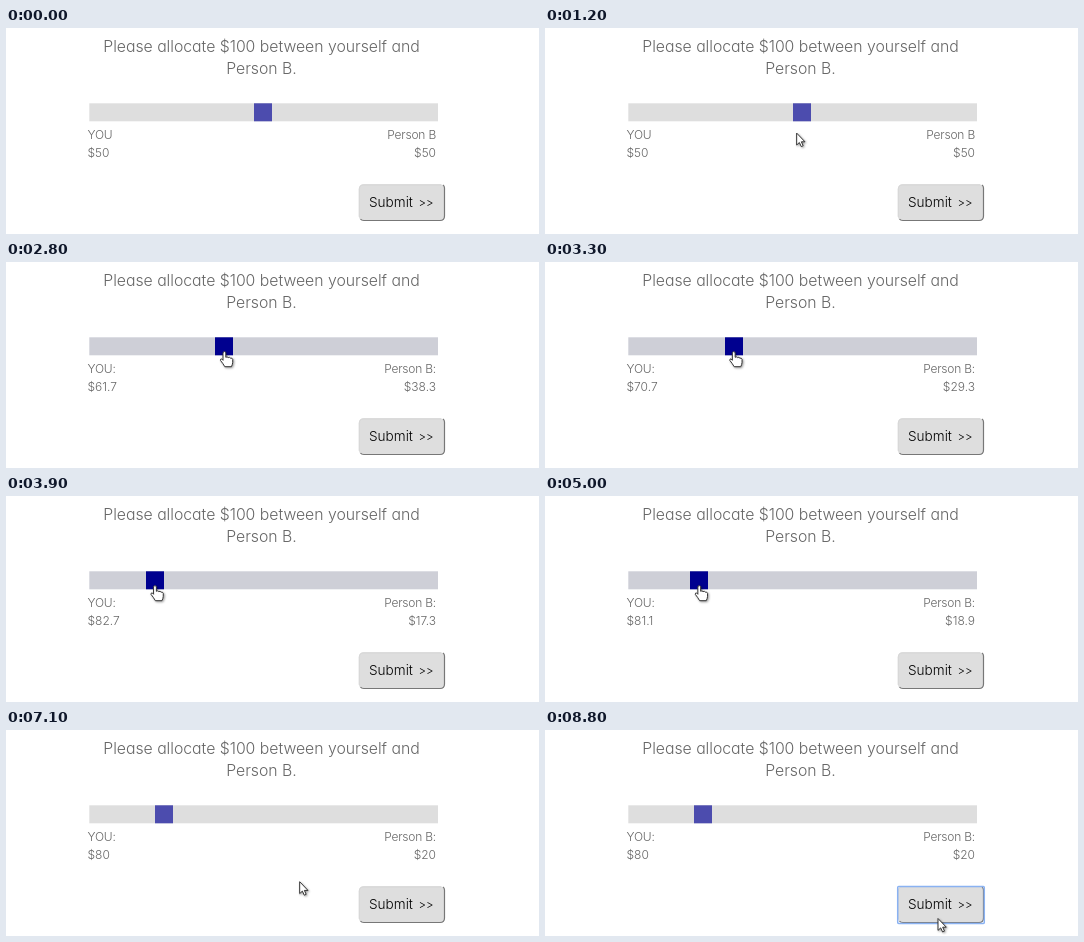
Write an HTML page that moves like this. It is 533 px wide and 206 px high and loops after 9600 ms.

```html
<!DOCTYPE html>
<html lang="en">
<head>
<meta charset="utf-8">
<title>Allocation slider</title>
<style>
  html, body { margin: 0; width: 100%; height: 100%; overflow: hidden; background: #fff; }
  svg { display: block; width: 100vw; height: 100vh; }
  text { font: 300 12px Inter, "Open Sans", sans-serif; font-feature-settings: "cv11"; fill: #666; }
  .title text { font-size: 15.8px; text-anchor: middle; letter-spacing: -.02px; }
  .label { letter-spacing: -.2px; }
  .right { text-anchor: end; }
  .submit { font-size: 13.6px; fill: #000; }
  .submit tspan { font-size: 11.5px; }
  .edge { fill: none; stroke-width: 1.2; }
  .cursor path { fill: #fff; stroke: #333; stroke-width: 1; stroke-linejoin: round; }
  .cursor { filter: drop-shadow(1.5px 1.5px 1px rgba(0, 0, 0, .4)); }
</style>
</head>
<body>
<svg viewBox="0 0 533 206">
  <g class="title">
    <text x="255.5" y="24">Please allocate $100 between yourself and</text>
    <text x="255.5" y="46">Person B.</text>
  </g>

  <rect id="track" x="83.3" y="75.3" width="348.7" height="18"/>
  <rect id="thumb" y="75.3" width="18" height="18"/>

  <text id="youLabel" class="label" x="81.5" y="111.3"></text>
  <text id="youValue" x="81.5" y="129.3"></text>
  <text id="otherLabel" class="label right" x="430" y="111.3"></text>
  <text id="otherValue" class="right" x="430" y="129.3"></text>

  <rect x="352.8" y="156.2" width="86.2" height="36.8" rx="5" fill="#dedede"/>
  <path id="edgeTop" class="edge" d="M353.4 189V161Q353.4 156.8 358 156.8H435"/>
  <path id="edgeBottom" class="edge" d="M354.5 191Q355.5 192.5 358 192.5H434Q438.5 192.5 438.5 188V160Q438.5 158 437 157"/>
  <rect id="focus" x="352.7" y="156.4" width="86.6" height="37" rx="1" fill="none" stroke="#8ab2f2" stroke-width="1.5"/>
  <text class="submit" x="363" y="179.4">Submit <tspan x="412.5">&gt;&gt;</tspan></text>

  <g id="arrow" class="cursor"><path d="M.5 .5V12.4L3.2 9.9L5.1 14L7 13.1L5.2 9.2H8.8Z"/></g>
  <g id="hand" class="cursor">
    <path d="M-1.4 1.2Q0 -.6 1.4 1.2V6Q2.7 5 3.8 6.3Q5.2 5.4 6.2 6.9Q7.6 6.3 8.3 8V11Q8.2 13 7 15.4H.4Q-1.5 12 -4 9Q-4 7.4 -2.7 7.6L-1.4 9Z"/>
  </g>
</svg>
<script>
const LOOP = 9600, STEP = 100;
const ENTER = 800, HOVER = 1400, PRESS = 1700, LEAVE = 6700, ARRIVE = 7500;
const CLICK = 8600, RELEASE = 8800;
const GRIP_Y = 89.3;

const $ = id => document.getElementById(id);
const set = (id, attrs) => { for (const k in attrs) $(id).setAttribute(k, attrs[k]); };
const write = (id, s) => { if ($(id).textContent !== s) $(id).textContent = s; };
const show = (id, on) => set(id, { visibility: on ? "visible" : "hidden" });
const ramp = (t, from, to) => Math.min(1, Math.max(0, (t - from) / (to - from)));
const easeOut = (u, power) => 1 - (1 - u) ** power;
const lerp = (a, b, k) => a + (b - a) * k;
const mix = (a, b, k) => `rgb(${a.map((v, i) => Math.round(lerp(v, b[i], k)))})`;
const money = v => "$" + +v.toFixed(1);

// One long drag to the left, two small corrections back, then a settle on 80.
const shareAt = t => 50
  + 32.7 * ramp(t, 1900, 3900) ** 1.285
  - 1.6 * ramp(t, 4500, 5000)
  - 1.6 * ramp(t, 5100, 5500)
  + 0.5 * ramp(t, 5900, 6100);

function pointerAt(t, center) {
  if (t < PRESS) {
    const k = easeOut(ramp(t, ENTER, PRESS), 2.85);
    return [lerp(225, center, k), lerp(171, GRIP_Y, k)];
  }
  const u = ramp(t, LEAVE, ARRIVE);
  return [
    lerp(center, 392.5, easeOut(u, 1.24)),
    lerp(GRIP_Y, 189, easeOut(u, 1.4)) - ramp(t, 7700, 7900)
  ];
}

function draw(t) {
  const share = shareAt(t);
  const center = 257.2 + (50 - share) * 3.31;
  const fade = ramp(t, HOVER - STEP, HOVER + STEP) - ramp(t, LEAVE, LEAVE + 2 * STEP);
  set("track", { fill: mix([222, 222, 222], [206, 207, 215], fade) });
  set("thumb", { x: Math.round(center - 9), fill: mix([76, 76, 174], [0, 0, 143], fade) });

  const colon = t >= PRESS ? ":" : "";
  write("youLabel", "YOU" + colon);
  write("otherLabel", "Person B" + colon);
  write("youValue", money(share));
  write("otherValue", money(100 - share));

  const over = t >= HOVER && t <= LEAVE;
  const place = { transform: `translate(${pointerAt(t, center).join(" ")})` };
  set("arrow", place);
  set("hand", place);
  show("arrow", t >= ENTER && !over);
  show("hand", over);

  const pressed = t >= CLICK && t < RELEASE;
  set("edgeTop", { stroke: pressed ? "#777" : "#d8d8d8" });
  set("edgeBottom", { stroke: pressed ? "#d8d8d8" : "#777" });
  show("focus", t >= CLICK);
}

const start = performance.now();
function tick() {
  const t = (performance.now() - start) % LOOP;
  draw(Math.floor(t / STEP) * STEP);
  requestAnimationFrame(tick);
}
tick();
</script>
</body>
</html>
```
